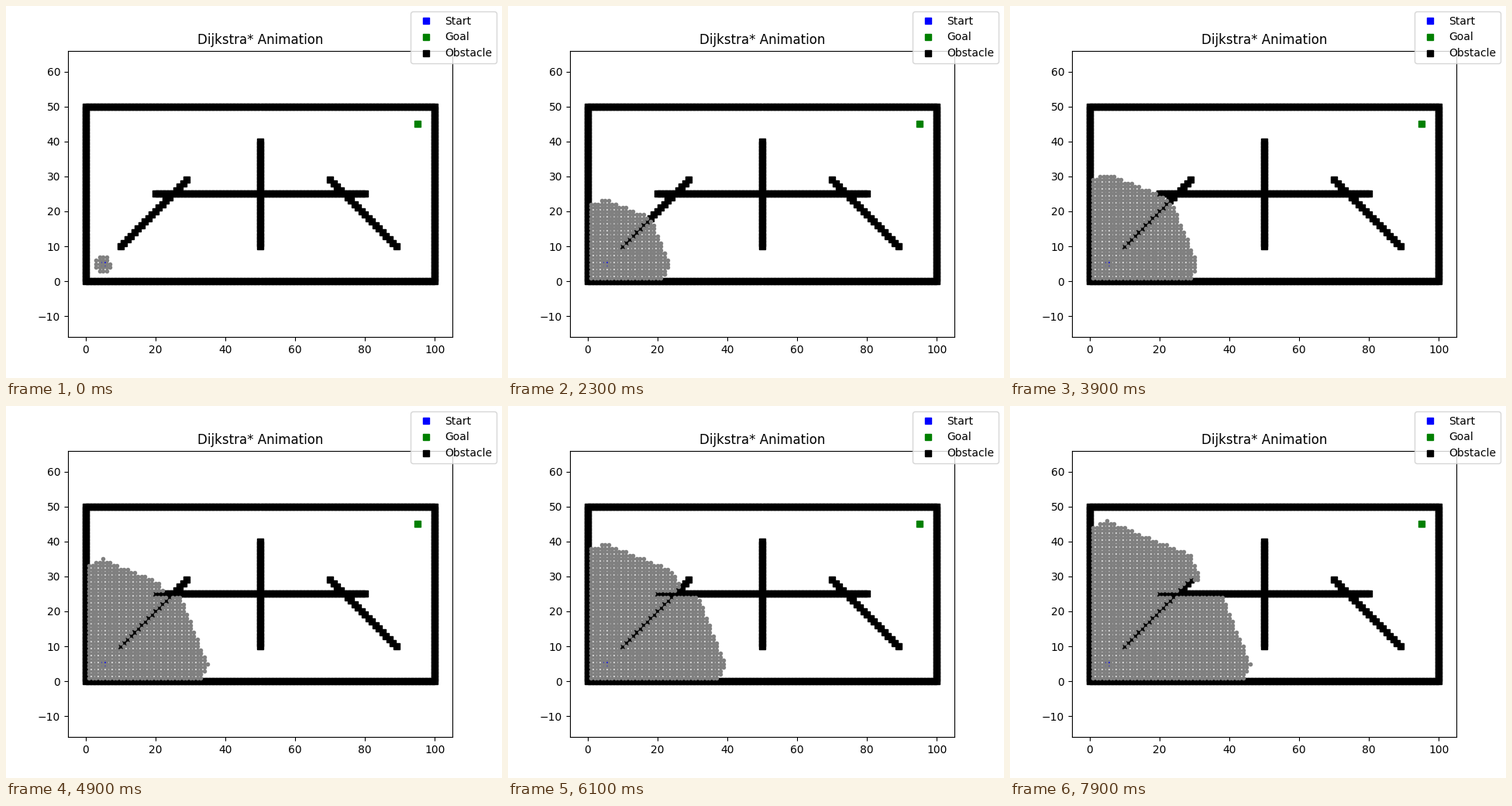
A matplotlib script for the animation above (8000 ms loop, 640 px wide and 480 px high).

```python
import math
from itertools import product

import matplotlib.pyplot as plt
from matplotlib.animation import FuncAnimation

WIDTH, HEIGHT = 100, 50
START, GOAL = (5, 5), (95, 45)
FRAMES, INTERVAL = 80, 100
PER_FRAME = 20
MOVES = [m for m in product((-1, 0, 1), repeat=2) if m != (0, 0)]


def build_obstacles():
    cells = [(x, y) for x in range(WIDTH + 1) for y in (0, HEIGHT)]
    cells += [(x, y) for x in (0, WIDTH) for y in range(HEIGHT + 1)]
    cells += [(x, 25) for x in range(20, 81)]
    cells += [(50, y) for y in range(10, 41)]
    cells += [(10 + i, 10 + i) for i in range(20)]
    cells += [(70 + i, 29 - i) for i in range(20)]
    return set(cells)


def is_blocked(x, y, dx, dy, obstacles):
    """A diagonal step may not cut the corner of an obstacle."""
    touched = {(x + dx, y + dy), (x + dx, y), (x, y + dy)}
    if not (dx and dy):
        touched = {(x + dx, y + dy)}
    return not touched.isdisjoint(obstacles)


def dijkstra(obstacles, limit):
    """Return the cells in the order they leave the queue."""
    cost = {START: 0.0}
    queue = [(0.0, START)]
    visited = []
    while queue and len(visited) < limit:
        entry = min(queue)
        queue.remove(entry)
        x, y = cell = entry[1]
        visited.append(cell)
        for dx, dy in MOVES:
            if is_blocked(x, y, dx, dy, obstacles):
                continue
            step = (x + dx, y + dy)
            new_cost = cost[cell] + math.hypot(dx, dy)
            if new_cost < cost.get(step, math.inf):
                cost[step] = new_cost
                queue.append((new_cost, step))
    return visited


obstacles = build_obstacles()
visited = dijkstra(obstacles, FRAMES * PER_FRAME)

fig, ax = plt.subplots(figsize=(6.4, 4.8), dpi=100)
ax.plot(*START, "bs", label="Start")
ax.plot(*GOAL, "gs", label="Goal")
ax.plot(*zip(*sorted(obstacles)), "ks", label="Obstacle")
explored, = ax.plot([], [], ".", color="gray")
ax.set_title("Dijkstra* Animation")
ax.axis("equal")
fig.legend()


def update(frame):
    explored.set_data(*zip(*visited[:(frame + 1) * PER_FRAME]))
    return explored,


anim = FuncAnimation(fig, update, frames=FRAMES, interval=INTERVAL,
                     repeat=True, repeat_delay=0)
plt.show()
```
